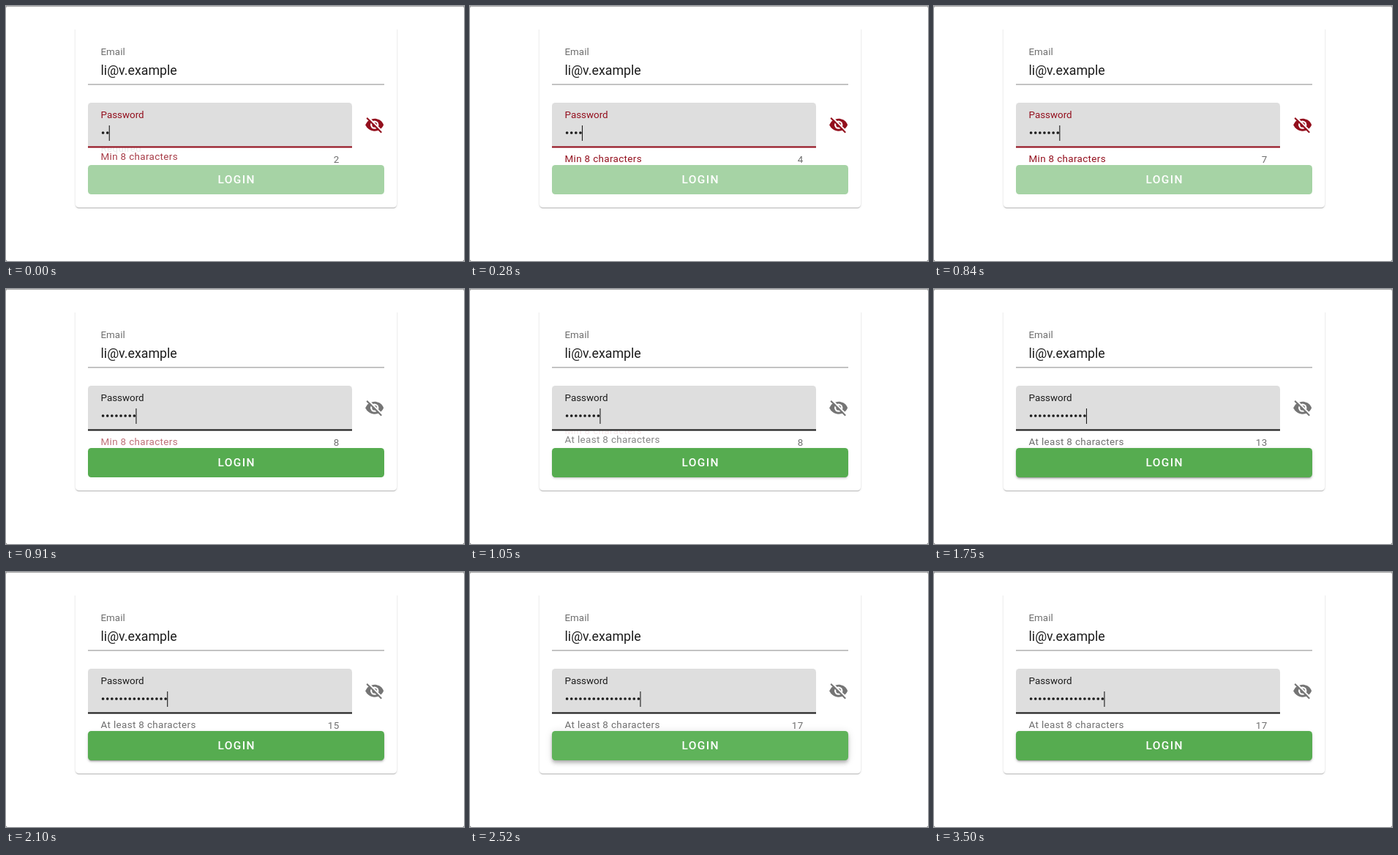
Write an HTML page that moves like this. It is 626x348 px and loops after 3.71 s.

```html
<!DOCTYPE html>
<html lang="en">
<head>
<meta charset="utf-8">
<title>Login form</title>
<style>
  html, body { margin: 0; width: 100%; height: 100%; overflow: hidden; background: #555; }
  #stage { position: relative; width: 626px; height: 348px; overflow: hidden; background: #fff;
    border-radius: 2px; box-shadow: inset 0 1px #a8a8a8; font-family: Roboto, sans-serif; }
  #scroll { position: absolute; inset: 32px 0 0; overflow: hidden; }
  #card { position: absolute; left: 95px; top: -20px; width: 439px; height: 262.7px; border-radius: 4.5px;
    background: #fff; box-shadow: 0 1.7px .6px -1.1px #0003, 0 1.1px 1.1px #00000024, 0 .6px 3.3px #0000001f; }
  svg { position: absolute; left: 0; top: 0; }
  text { font-size: 13.4px; fill: #6e6e6e; }
  .spaced { letter-spacing: .36px; }
  #button { position: absolute; left: 112px; top: 217.2px; width: 405px; height: 40px; border-radius: 4.5px;
    box-sizing: border-box; padding-left: 1.4px; text-align: center; color: #fff;
    font-size: 15.5px; font-weight: 500; line-height: 40.6px; letter-spacing: 1.4px; }
</style>
</head>
<body>
<div id="stage">
  <div id="scroll"><div id="card"></div></div>
  <svg width="626" height="348">
    <text x="129.5" y="67.3">Email</text>
    <text x="129.5" y="94" style="font-size:17.8px;fill:#1c1c1c">li@v.example</text>
    <rect x="112" y="106.5" width="405" height="1.1" fill="#949494"/>

    <text id="required" class="spaced" x="129.5" y="212.9">Required</text>
    <text id="minimum" class="spaced" x="129.5" y="212.9" style="fill:#930f1d">Min 8 characters</text>
    <text id="hint" class="spaced" x="129.5" y="212.9">At least 8 characters</text>
    <text id="counter" class="spaced" x="455.6" y="214.3" text-anchor="end"></text>

    <path d="M112 193V136.5a4.5 4.5 0 0 1 4.5-4.5H468.5a4.5 4.5 0 0 1 4.5 4.5V193Z" fill="#dedede"/>
    <rect id="underline" x="112" y="191.4" width="361" height="2.1"/>
    <text id="label" x="129.5" y="153.4">Password</text>
    <line id="dots" x1="132.6" y1="173" y2="173" stroke="#1c1c1c" stroke-width="3.7"
      stroke-linecap="round" stroke-dasharray="0 6.11"/>
    <rect id="caret" y="163" width="1.1" height="21" fill="#1c1c1c"/>

    <g id="eye" transform="translate(490.2 148.6) scale(1.13)">
      <path d="M1 12C2.73 7.61 7 4.5 12 4.5S21.27 7.61 23 12C21.27 16.39 17 19.5 12 19.5S2.73 16.39 1 12Z"/>
      <circle cx="12" cy="12" r="5" fill="#fff"/>
      <circle cx="12" cy="12" r="3"/>
      <path d="M3.5 1.95L22 20.45" stroke="#fff" stroke-width="1.9"/>
      <path d="M2.64 3.64L20.36 21.36" stroke="currentColor" stroke-width="1.8"/>
    </g>
  </svg>
  <div id="button">LOGIN</div>
</div>
<script>
const LOOP = 3710, STEP = 70, VALID_AT = 910;
const KEY_TIMES = [140, 280, 420, 630, 770, 910, 1120, 1260, 1400, 1540, 1750, 1890, 2100, 2240, 2380];
const el = id => document.getElementById(id);
const ramp = (t, start, length) => Math.min(1, Math.max(0, (t - start) / length));
const easeOut = p => 1 - (1 - p) ** 3;
const mix = (a, b, p) => a + (b - a) * p;

function place(id, shown, strength = 1) {
  el(id).setAttribute('opacity', shown * strength);
  el(id).setAttribute('transform', `translate(0 ${-17 * (1 - shown)})`);
}

function buttonShadow(amount, hover) {
  const layer = (y, blur, spread, alpha) =>
    `0 ${y}px ${blur}px ${spread}px rgba(0,0,0,${alpha * amount})`;
  return [
    layer(mix(3.3, 2.2, hover), mix(1.1, 4.5, hover), mix(-2.2, -1.1, hover), .2),
    layer(mix(2.2, 4.5, hover), mix(2.2, 5.6, hover), 0, .14),
    layer(1.1, mix(5.5, 11, hover), 0, .12)
  ].join();
}

function draw(t) {
  const count = 2 + KEY_TIMES.filter(k => k <= t).length;
  const valid = t >= VALID_AT;
  const accent = valid ? '#1c1c1c' : '#930f1d';
  const iconColor = valid ? '#757575' : '#930f1d';

  el('dots').setAttribute('x2', 132.7 + 6.11 * (count - 1));
  el('caret').setAttribute('x', 128.5 + 6.11 * count);
  el('caret').setAttribute('opacity', t >= 3010 && t < 3500 ? 0 : 1);
  el('counter').textContent = count;
  el('label').style.fill = accent;
  el('underline').style.fill = accent;
  el('eye').style.fill = el('eye').style.color = iconColor;

  const first = easeOut(ramp(t, -130, 300));
  const second = easeOut(ramp(t, VALID_AT, 300));
  place('required', 1 - first, .8);
  if (valid) place('minimum', 1 - second, .6);
  else place('minimum', first);
  place('hint', second);

  const hover = ramp(t, 2310, 210) - ramp(t, 3150, 280);
  const rgb = [[86, 95], [172, 179], [80, 90]].map(([a, b]) => mix(a, b, hover));
  el('button').style.background = valid ? `rgb(${rgb})` : '#a6d3a5';
  el('button').style.boxShadow = buttonShadow(ramp(t, VALID_AT, 280), hover);
}

const start = performance.now();
function tick() {
  const t = (performance.now() - start) % LOOP;
  draw(Math.floor(t / STEP) * STEP);
  requestAnimationFrame(tick);
}
tick();
</script>
</body>
</html>
```
